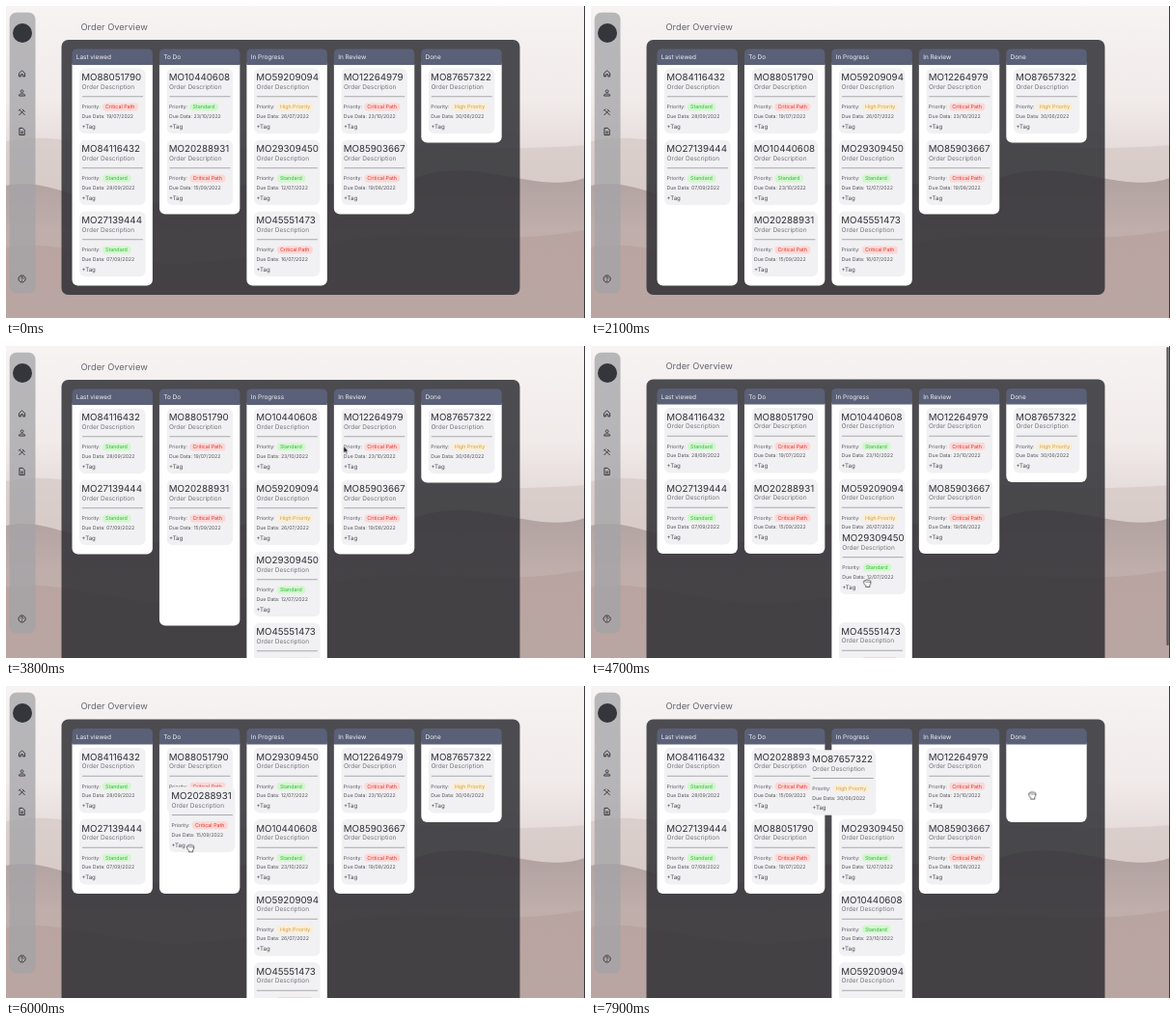
These frames come from a looping animation (600x323 px, 8000 ms). An HTML page:

```html
<!DOCTYPE html>
<html lang="en">
<head>
<meta charset="utf-8">
<title>Order Overview</title>
<style>
  html, body { margin: 0; width: 100%; height: 100%; overflow: hidden; background: #f4f1f0; }
  svg { display: block; width: 600px; height: 323px; }
  text { font-family: Inter, Roboto, "Liberation Sans", sans-serif; text-rendering: geometricPrecision; }
  .icon { fill: none; stroke: #34363b; stroke-width: 2.6; stroke-linejoin: round; }
</style>
</head>
<body>
<svg viewBox="0 0 600 323">
  <defs>
    <linearGradient id="sky" x1="0" y1="0" x2="0" y2="1">
      <stop offset="0" stop-color="#f6f3f2"/>
      <stop offset=".3" stop-color="#f1ebea"/>
      <stop offset=".55" stop-color="#dfd4d2"/>
      <stop offset="1" stop-color="#c6b4b0"/>
    </linearGradient>
    <linearGradient id="mid" x1="0" y1="0" x2="0" y2="1">
      <stop offset="0" stop-color="#a89898"/>
      <stop offset=".4" stop-color="#bba9a6"/>
      <stop offset="1" stop-color="#c0aca7"/>
    </linearGradient>
  </defs>
  <rect width="600" height="323" fill="url(#sky)"/>
  <path fill="#d6c9c7" opacity=".7" d="M0 140C50 130 90 146 150 150S300 138 360 140 500 152 600 144V323H0Z"/>
  <path fill="url(#mid)" opacity=".85" d="M0 186C35 178 60 196 110 204S210 186 270 182 370 196 430 176 550 196 600 178V323H0Z"/>
  <path fill="#b49f9b" opacity=".6" d="M0 250C40 240 100 262 160 266S300 250 370 240 500 250 600 232V323H0Z"/>
  <g id="page"></g>
  <g id="side">
    <rect x="3.7" y="6.8" width="26.8" height="290.4" rx="7" fill="#a3a4a7" opacity=".76"/>
    <circle cx="17" cy="28" r="10" fill="#34363b"/>
  </g>
  <rect id="thumb" x="596.4" y="1" width="2.3" height="309" rx="1.1" fill="#59565a"/>
  <rect x="599" width="1" height="323" fill="#3d393b"/>
</svg>
<script>
const LOOP = 8000, TICK = 100, COL = 90.45, ROW = 74, SLIP = 200;
const GLIDE = 'cubic-bezier(.2,0,0,1)';
const SWAY = 'cubic-bezier(.37,0,.63,1)';
const OUT = 'cubic-bezier(.333,1,.667,1)';
const byId = id => document.getElementById(id);
const page = byId('page');
const anims = [];

function add(parent, tag, attrs, text) {
  const el = document.createElementNS('http://www.w3.org/2000/svg', tag);
  for (const key in attrs) el.setAttribute(key, attrs[key]);
  if (text) el.textContent = text;
  parent.append(el);
  return el;
}

const label = (parent, x, y, size, fill, text) =>
  add(parent, 'text', { x, y, 'font-size': size, fill }, text);

// steps: [time, properties, easing]
function run(el, steps) {
  const keys = steps.map(([t, props, easing = 'linear']) => ({ offset: t / LOOP, easing, ...props }));
  const anim = el.animate(
    [{ ...keys[0], offset: 0 }, ...keys, { ...keys.at(-1), offset: 1 }], LOOP);
  anim.pause();
  anims.push(anim);
}

const move = (el, steps) => run(el, steps.map(([t, x, y, ease]) =>
  [t, { transform: `translate(${x}px, ${y}px)` }, ease]));

const show = (el, spans) => run(el, [[0, { opacity: 0 }, 'step-end'],
  ...spans.flatMap(([on, off]) => [[on, { opacity: 1 }, 'step-end'], [off, { opacity: 0 }, 'step-end']])]);

const grow = (el, steps) => run(el, steps.map(([t, h]) => [t, { height: h + 'px' }, GLIDE]));

// Sidebar icons
[
  [70, 'M4 11l8-7 8 7v9h-5v-6H9v6H4z'],
  [90, 'M12 4a3.6 3.6 0 1 0 .1 0zM4 20v-2c0-4.5 16-4.5 16 0v2z'],
  [110, 'M4 20L16 8M13 4l7 7M5 5l15 15M3 8l5-5'],
  [130, 'M5 2.5h9l5 5v14H5zM8.5 12.5h7M8.5 17h7'],
  [282.5, 'M12 2.5a9.5 9.5 0 1 0 .1 0zM9 9.5c0-4.5 6.5-3.5 6 0 0 2-3 2-3 4.5M12 16.5v2']
].forEach(([y, d]) => add(byId('side'), 'path',
  { class: 'icon', d, transform: `translate(12 ${y - 4.6}) scale(.38)` }));

// Board
const board = [
  ['Last viewed', 'MO88051790 crit 19/07/2022', 'MO84116432 std 28/09/2022', 'MO27139444 std 07/09/2022'],
  ['To Do', 'MO10440608 std 23/10/2022', 'MO20288931 crit 15/09/2022'],
  ['In Progress', 'MO59209094 high 26/07/2022', 'MO29309450 std 12/07/2022', 'MO45551473 crit 16/07/2022'],
  ['In Review', 'MO12264979 crit 23/10/2022', 'MO85903667 crit 19/08/2022'],
  ['Done', 'MO87657322 high 30/06/2022']
];
const LEVELS = {
  crit: ['Critical Path', 37, '#fbd8d6', '#e8332e'],
  std: ['Standard', 29.5, '#d2f7ce', '#35b93a'],
  high: ['High Priority', 37, '#faeed5', '#d3a044']
};

label(page, 77.5, 24.6, 9.3, '#656672', 'Order Overview');
const panel = add(page, 'rect', { x: 57.5, y: 35, width: 475, rx: 7, fill: '#333338', 'fill-opacity': .87 });
const columnLayer = add(page, 'g');
const cardLayer = add(page, 'g');
const bodyHeight = n => 12.5 + ROW * n;
const panelHeight = n => 42 + ROW * n;

function makeCard(text, col, row) {
  const [id, level, date] = text.split(' ');
  const [name, width, back, ink] = LEVELS[level];
  const el = add(cardLayer, 'g');
  add(el, 'rect', { x: 76, y: 64.7, width: 68.6, height: 67.4, rx: 6, fill: '#f1f0f2' });
  label(el, 78.3, 77.2, 9.75, '#303136', id);
  label(el, 78.6, 85.9, 6.5, '#77787e', 'Order Description');
  add(el, 'rect', { x: 79, y: 93.4, width: 63, height: .8, fill: '#98989c' });
  label(el, 78.5, 106.3, 5.2, '#55565d', 'Priority:');
  add(el, 'rect', { x: 100, y: 100.4, width, height: 8, rx: 3.6, fill: back });
  label(el, 103, 106.3, 5.35, ink, name);
  label(el, 78.5, 116, 5.2, '#55565d', 'Due Data: ' + date);
  label(el, 78.6, 126.8, 6.1, '#4a4b51', '+Tag');
  return { id, el, col, row, steps: [[0, col, row]] };
}

const columns = board.map(([name, ...texts], i) => {
  const g = add(columnLayer, 'g', { transform: `translate(${68.5 + i * COL} 0)` });
  const body = add(g, 'rect', { y: 55, width: 83.4, rx: 6, fill: '#fff' });
  add(g, 'path', { d: 'M0 61V49.5q0-5 5-5h73.4q5 0 5 5V61z', fill: '#5a6077' });
  label(g, 4.3, 55.4, 6.45, '#eef0f5', name);
  const cards = texts.map((text, row) => makeCard(text, i, row));
  return { body, cards, sizes: [[0, bodyHeight(cards.length)]] };
});
const allCards = columns.flatMap(c => c.cards);

// Drags: grab is the first jerk, gap the time the neighbours make room, grip the hand on the card
const drags = [
  { id: 'MO88051790', from: 1370, until: 2165, gap: 1485, to: [1, 0], ease: OUT },
  { id: 'MO10440608', from: 2900, until: 3600, gap: 3100, to: [2, 0], ease: SWAY, grab: [.045, -.01], grip: [115.5, 74] },
  { id: 'MO29309450', from: 4600, until: 4990, gap: 4760, to: [2, 0], ease: SWAY, grab: [.01, 0], grip: [104.6, 121] },
  { id: 'MO20288931', from: 5600, until: 6450, gap: 6080, to: [1, 0], ease: SWAY, grab: [.05, 0], grip: [98.2, 128.5] },
  { id: 'MO87657322', from: 7400, until: 7900, gap: 7560, to: [1.667, .03], ease: OUT, grip: [95.5, 114.2], still: true }
];

function hand(parent, [x, y], span) {
  const el = add(parent, 'path', {
    d: 'M-3.5-.5q-1-2.2.5-2.2l.4.3q0-1.6 1.5-1.2.9-.9 1.8 0 1.3-.6 1.7.5 1.4-.1 1.3 1.3 0 2.5-1.2 3.6v1.7h-4v-1.4q-1.3-1.1-2-2.6zM-1-2.3v1.3M.8-2.3v1.3M2.3-2v1',
    transform: `translate(${x} ${y})`, fill: '#fff', stroke: '#222', 'stroke-width': .7, 'stroke-linejoin': 'round'
  });
  show(el, [span]);
}

function resize(column, t) {
  if (t + SLIP > LOOP) return;
  column.sizes.push([t, column.sizes.at(-1)[1]], [t + SLIP, bodyHeight(column.cards.length)]);
}

function closeRanks(column, t) {
  column.cards.forEach((card, row) => {
    if (card.row === row) return;
    card.steps.push([t, card.col, card.row, GLIDE], [t + SLIP, card.col, row]);
    card.row = row;
  });
}

// The arrow travels from each release to the next grip
const stops = [[2300, 212, 102], [3800, 349.8, 103.6]];
const gaps = [];
let freeFrom = 2300;

for (const d of drags) {
  const card = d.card = allCards.find(c => c.id === d.id);
  const { col, row } = card;
  const [gx, gy] = d.grab ?? [0, 0];
  const [toCol, toRow] = d.to.map(Math.round);
  const source = columns[col], target = columns[toCol];

  card.steps.push([d.from, col, row], [d.from, col + gx, row + gy, d.ease], [d.until, ...d.to]);
  source.cards.splice(row, 1);
  target.cards.splice(toRow, 0, card);
  Object.assign(card, { col: toCol, row: toRow });
  closeRanks(source, d.gap);
  closeRanks(target, d.gap + 33);
  if (source !== target) {
    resize(target, d.gap + 50);
    resize(source, d.until + SLIP);
  }

  if (!d.grip) continue;
  const [x, y] = d.grip;
  const spot = (c, r) => [c * COL + x, r * ROW + y - 2];
  stops.push([d.from, ...spot(col, row)], [d.until, ...spot(...d.to)]);
  gaps.push([freeFrom, d.from]);
  freeFrom = d.until;
  if (d.still) hand(page, [col * COL + x, y], [d.from, LOOP - 1]);
  else hand(card.el, d.grip, [d.from, d.until]);
}

for (const c of allCards) move(c.el, c.steps.map(([t, x, y, ease]) => [t, x * COL, y * ROW, ease]));
for (const c of columns) grow(c.body, c.sizes);
grow(panel, columns[2].sizes.map(([t, h]) => [t, h - bodyHeight(0) + panelHeight(0)]));

const arrow = add(page, 'path', { d: 'M0 0v7.2l1.7-1.5 1.2 2.6 1.2-.6-1.2-2.5h2.2z', fill: '#111', stroke: '#fff', 'stroke-width': .6 });
move(arrow, stops.sort((a, b) => a[0] - b[0]));
show(arrow, gaps);

// Slight page scroll
run(page, [[0, { transform: 'translateY(0px)' }, 'step-end'], [4700, { transform: 'translateY(-.6px)' }, 'step-end']]);
run(byId('thumb'), [[0, { opacity: 0 }, 'step-end'], [4700, { opacity: 1 }], [5200, { opacity: 1 }], [5500, { opacity: 0 }]]);

let start;
function draw(now) {
  start ??= now;
  const t = Math.floor((now - start + 20) / TICK) * TICK % LOOP;
  for (const a of anims) a.currentTime = t;
  const held = drags.find(d => t >= d.from && t <= d.until)?.card.el;
  if (held && held !== cardLayer.lastChild) cardLayer.append(held);
  requestAnimationFrame(draw);
}
requestAnimationFrame(draw);
</script>
</body>
</html>
```
